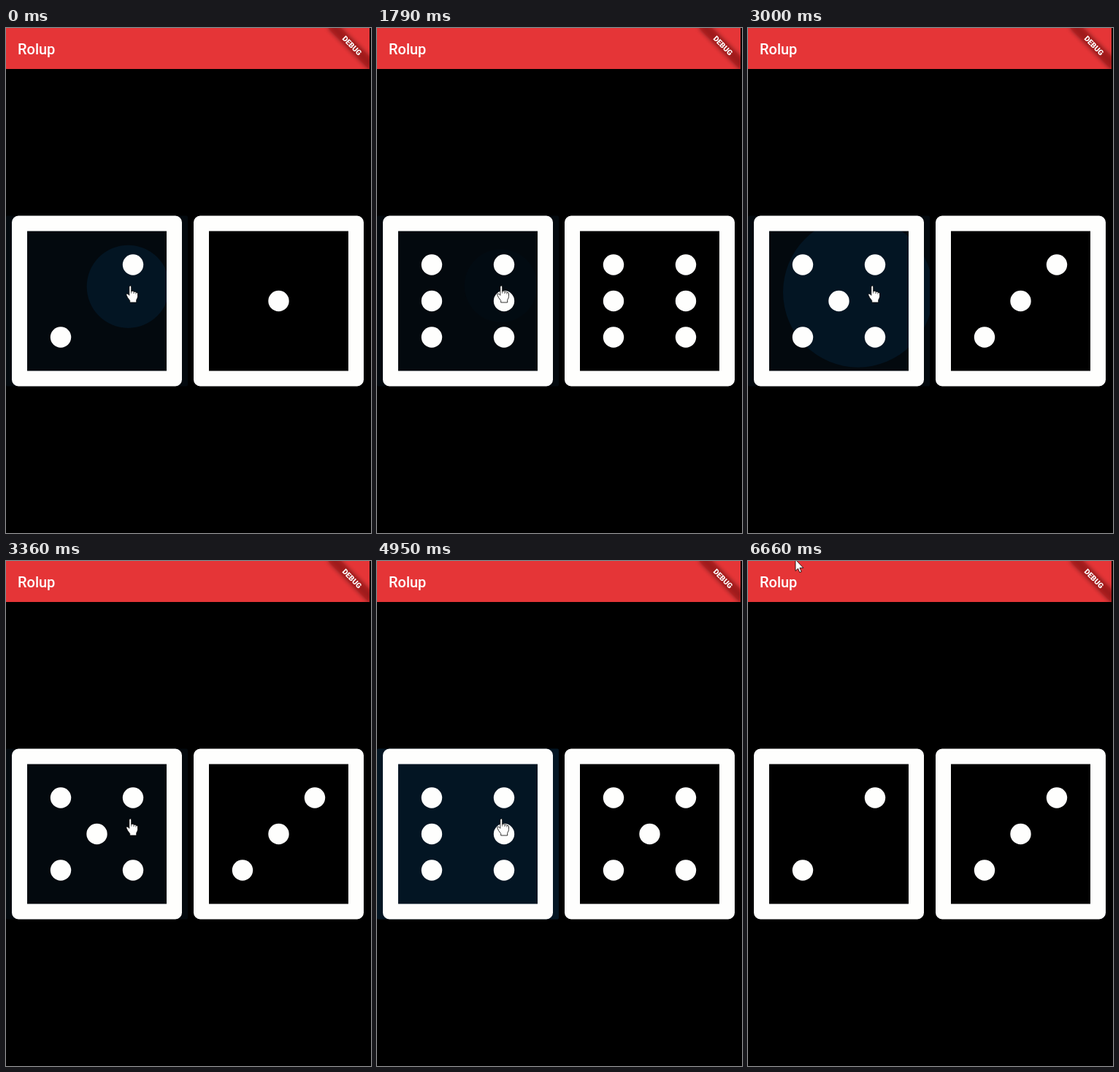
Animation of 500x690 px, one loop 7.46 s. Source, as an HTML page:

```html
<!DOCTYPE html>
<html lang="en">
<head>
<meta charset="utf-8">
<title>Dice</title>
<style>
  html, body { margin: 0; width: 100%; height: 100%; overflow: hidden; background: #000; }
  svg { display: block; }
  text { font-family: Roboto, sans-serif; fill: #fff; }
  .title { font-size: 20px; font-weight: 500; }
  .debug { font-size: 10.2px; font-weight: 900; text-anchor: middle; }
  .die { fill: #fefefd; }
  .cursor path { fill: #fefefd; stroke: #000; stroke-width: .8; stroke-linejoin: round; }
  .cursor .lines { fill: none; stroke-width: .7; }
</style>
</head>
<body>
<svg width="500" height="690" viewBox="0 0 500 690">
  <defs>
    <clipPath id="button"><rect y="256.5" width="249" height="233" rx="2"/></clipPath>
    <clipPath id="screen"><rect width="498" height="690"/></clipPath>
    <filter id="blur" x="-30%" y="-150%" width="160%" height="400%"><feGaussianBlur stdDeviation="3"/></filter>
    <path id="frame" fill-rule="evenodd"
      d="M17 256.5H232a9 9 0 0 1 9 9V480.5a9 9 0 0 1-9 9H17a9 9 0 0 1-9-9V265.500a9 9 0 0 1 9-9zM29 277.500V468.500H220V277.500z"/>
  </defs>

  <rect width="498" height="56" fill="#e53537"/>
  <text class="title" x="16" y="36">Rolup</text>
  <g clip-path="url(#screen)">
    <g transform="translate(498 0) rotate(45)">
      <rect x="-40" y="28" width="80" height="12" fill="#000" opacity=".5" filter="url(#blur)"/>
      <rect x="-40" y="28" width="80" height="12" fill="#b71c1c" opacity=".63"/>
      <text class="debug" y="37.600">DEBUG</text>
    </g>
  </g>

  <g clip-path="url(#button)">
    <rect id="hover" y="256" width="249" height="235" fill="#03090e"/>
    <circle id="ripple" fill="#031523"/>
  </g>
  <g class="die" id="left"><use href="#frame"/></g>
  <g class="die" id="right" transform="translate(249 0)"><use href="#frame"/></g>

  <g class="cursor" id="cursor">
    <g id="hand" transform="translate(-170 -352)">
      <path d="M168.800 354q0-2 1.400-2q1.500 0 1.500 2v5.500q2.800-.8 3.300.8q2.400-.6 2.900.9q2.600-.2 2.600 1.800v3.500q0 2.500-1.800 5v3.500h-9v-2.500q-3.500-4-4.800-7.500q-.6-2 1-2q1.200 0 2.900 2.300z"/>
      <path class="lines" d="M171.700 359v3.500M175 360.500v2.500M177.900 361.500v2"/>
    </g>
    <path id="arrow" d="M0 0V15.500l3.500-3.200 2.300 5.300 2.400-1-2.300-5.200h4.900z"/>
  </g>
</svg>
<script>
const LOOP = 7460;
const TAP = { x: 170, y: 352 };
const CENTER = { x: 124.5, y: 373 };
const R0 = 49, R1 = 176;
const LEAVE = 5930;

// press time, release time, values rolled on release
const taps = [
  [-75, 95, 3, 4],
  [845, 945, 6, 6],
  [1775, 1945, 5, 1],
  [2795, 2985, 5, 3],
  [3545, 3885, 5, 3],
  [4585, 4735, 6, 5],
  [5345, 5450, 2, 3]
];

// pip spots as column,row pairs
const faces = ['', '11', '20 02', '20 11 02', '00 20 02 22', '00 20 11 02 22', '00 20 01 21 02 22'];

const $ = id => document.getElementById(id);
const clamp = v => Math.min(1, Math.max(0, v));
const mix = (a, b, k) => a + (b - a) * k;

function set(el, attrs) {
  for (const key in attrs) el.setAttribute(key, attrs[key]);
}

// cubic-bezier(.25, .1, .25, 1)
function ease(x) {
  const bez = (s, a, b) => 3 * s * (1 - s) ** 2 * a + 3 * s * s * (1 - s) * b + s ** 3;
  let lo = 0, hi = 1;
  for (let i = 0; i < 20; i++) {
    const mid = (lo + hi) / 2;
    if (bez(mid, .25, .25) < x) lo = mid; else hi = mid;
  }
  return bez(lo, .1, 1);
}

function makeDie(id) {
  const pips = {};
  for (let c = 0; c < 3; c++) for (let r = 0; r < 3; r++) {
    const pip = document.createElementNS('http://www.w3.org/2000/svg', 'circle');
    set(pip, { cx: 75 + c * 49.5, cy: 323.5 + r * 49.5, r: 14.2 });
    $(id).append(pip);
    pips[`${c}${r}`] = pip;
  }
  return value => {
    const on = faces[value].split(' ');
    for (const key in pips) pips[key].style.display = on.includes(key) ? '' : 'none';
  };
}

const showLeft = makeDie('left'), showRight = makeDie('right');

function drawDice(t) {
  let left = 2, right = 1;
  for (const [, up, a, b] of taps) if (t >= up) [left, right] = [a, b];
  showLeft(left);
  showRight(right);
}

// Grows slowly while held, quickly after release, then fades.
function drawRipple(t) {
  const tap = taps.findLast(([down]) => t >= down);
  const [down, up] = tap;
  const held = clamp((Math.min(t, up) - down) / 1000);
  const grow = ease(clamp(held + Math.max(0, t - up) / 225));
  const last = tap === taps[taps.length - 1];
  const fadeStart = last ? LEAVE + 30 : up + 225;
  const alpha = clamp((t - down) / 75) * (1 - clamp((t - fadeStart) / 150));
  set($('ripple'), {
    cx: mix(TAP.x, CENTER.x, grow),
    cy: mix(TAP.y, CENTER.y, grow),
    r: mix(R0, R1, grow),
    opacity: alpha
  });
}

function pointerAt(t) {
  if (t >= 6660) return [65, -2];
  if (t >= 6560) return [110, 65];
  const k = clamp((t - LEAVE) / 340);
  const s = k * (2 - k);
  return [mix(TAP.x, 151, s), mix(TAP.y, 131, s)];
}

function drawPointer(t) {
  const [x, y] = pointerAt(t);
  const inside = y > 256;
  set($('cursor'), { transform: `translate(${x} ${y})` });
  $('hand').style.display = inside ? '' : 'none';
  $('arrow').style.display = inside ? 'none' : '';
  set($('hover'), { opacity: 1 - clamp((t - LEAVE - 90) / 50) });
}

let start;
function tick(now) {
  start ??= now;
  const t = (now - start) % LOOP;
  drawDice(t);
  drawRipple(t);
  drawPointer(t);
  requestAnimationFrame(tick);
}
requestAnimationFrame(tick);
</script>
</body>
</html>
```
